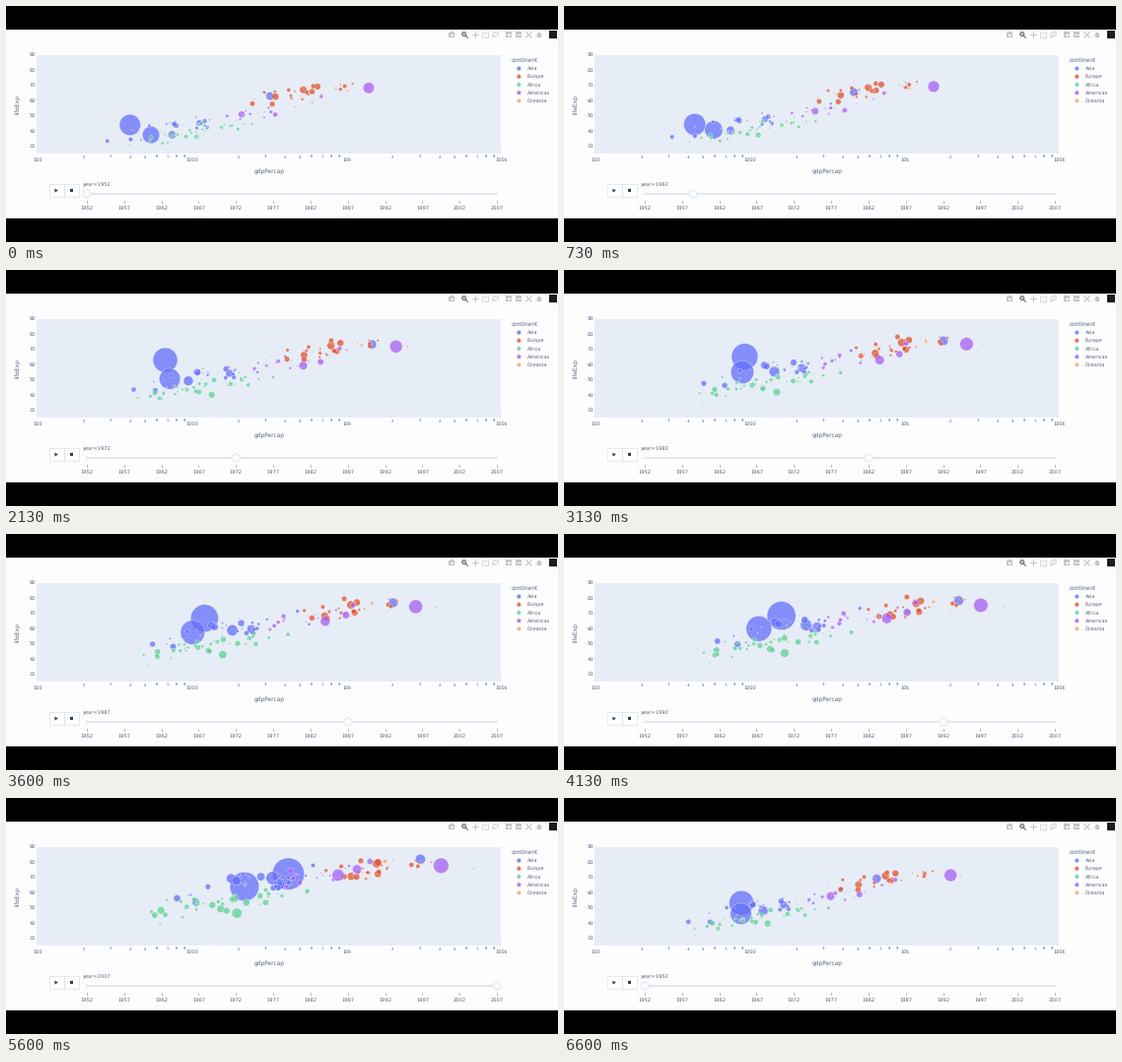
A matplotlib script that plays this animation: 560 px wide and 240 px high, repeating every 6670 ms.

```python
import matplotlib.pyplot as plt
import numpy as np
from matplotlib.animation import FuncAnimation
from matplotlib.patches import Circle, Ellipse, FancyBboxPatch, Polygon, Rectangle

plt.rcParams.update({"font.family": "DejaVu Sans", "text.hinting": "none"})

W, H, DPI = 560, 240, 80
PT = 72 / DPI                      # points per pixel
FRAMES, INTERVAL = 230, 29
TICK = 66.7                        # the picture is refreshed 15 times a second
FIRST, PERIOD, MOVE, GRIP_MOVE = 152, 519, 500, 150
REPLAY = 6318
INK, RAIL = "#566380", "#ccd4e1"
SOFT, DARK = "#c4c4c6", "#77777c"
LEFT, RIGHT, TOP, BOTTOM = 31.3, 502.0, 50.0, 150.2
YEARS = np.arange(12)
COLORS = {"Asia": "#636efa", "Europe": "#de5230", "Africa": "#5fd096",
          "Americas": "#a660f4", "Oceania": "#f5a866"}

rng = np.random.default_rng(7)


# ---------- data ----------
def x_of(log_gdp):
    return LEFT + (log_gdp - 2) * (RIGHT - LEFT) / 3


def y_of(life):
    return TOP + (90 - life) * (BOTTOM - TOP) / 65


def track(log_gdp, life, pop, grow):
    """x, y and diameter per year; the population grows by a constant rate."""
    pop = pop * grow ** (YEARS / 11)
    return x_of(log_gdp), y_of(life), 33 * np.sqrt(pop / 1318)


def leader(pop, grow, *keys):
    """A large country, led through a few (year, gdp, life) points."""
    year, gdp, life = zip(*keys)
    return track(np.interp(YEARS, year, np.log10(gdp)),
                 np.interp(YEARS, year, life), pop, grow)


def crowd(n, gdp, spread, rise, life, gain, pop, decay, grow):
    """Countries strewn along a typical course, each smaller than the last."""
    s = YEARS / 11
    for rank in range(n):
        rich, pace, health, care = np.clip(rng.normal(size=4), -1.8, 1.8)
        log_gdp = gdp + spread * rich + (rise + 0.13 * pace) * s
        years = (life + 16 * spread * rich + 2.5 * health
                 + (gain + 2.5 * care) * s * (1.3 - 0.3 * s))
        yield track(log_gdp, np.minimum(years, 82 - rank % 5), pop * decay ** rank, grow)


LEADERS = {
    "Asia": [
        leader(556, 2.37, (0, 400, 44), (2, 488, 44.5), (3, 613, 58.4), (4, 677, 63.1),
               (6, 962, 65.5), (8, 1656, 68.7), (11, 4959, 73)),
        leader(372, 2.98, (0, 547, 37.4), (4, 724, 50.7), (8, 1164, 60.2), (11, 2452, 64.7)),
        leader(82, 2.73, (0, 750, 37.5), (3, 762, 46), (8, 2383, 62.7), (11, 3541, 70.7)),
        leader(86, 1.48, (0, 3217, 63), (4, 14779, 73.4), (11, 31656, 82.6)),
    ],
    "Africa": [leader(33, 4.1, (0, 1077, 36.3), (11, 2014, 46.9))],
    "Americas": [
        leader(57, 3.33, (0, 2109, 50.9), (5, 6660, 61.5), (11, 9066, 72.4)),
        leader(30, 3.63, (0, 3478, 50.8), (6, 9611, 67.4), (11, 11978, 76.2)),
        leader(158, 1.91, (0, 13990, 68.4), (11, 42952, 78.2)),
    ],
}
CROWDS = {
    "Asia": crowd(27, 3.05, 0.33, 0.50, 46, 23, 47, 0.85, 3.0),
    "Europe": crowd(29, 3.76, 0.21, 0.52, 66, 11, 69, 0.87, 1.3),
    "Africa": crowd(48, 2.98, 0.24, 0.18, 39, 15, 22, 0.93, 3.6),
    "Americas": crowd(21, 3.48, 0.20, 0.35, 53, 20, 18, 0.82, 2.6),
    "Oceania": crowd(2, 4.01, 0.01, 0.45, 69, 11, 9, 0.25, 2.3),
}
tracks, fills = [], []
for name, color in COLORS.items():
    group = LEADERS.get(name, []) + list(CROWDS[name])
    tracks += group
    fills += [color] * len(group)
DATA = np.array(tracks).transpose(1, 2, 0)      # (x y d, year, country)

# ---------- stage ----------
fig = plt.figure(figsize=(W / DPI, H / DPI), dpi=DPI, facecolor="black")
ax = fig.add_axes([0, 0, 1, 1])
ax.set(xlim=(0, W), ylim=(H, 0))
ax.axis("off")


def add(patch, z=1):
    patch.set_zorder(z)
    return ax.add_patch(patch)


def box(x, y, w, h, fill="none", edge="none", lw=0.5, z=1, **kw):
    return add(Rectangle((x, y), w, h, fc=fill, ec=edge, lw=lw * PT, **kw), z)


def line(xs, ys, color, lw, z=1):
    ax.plot(xs, ys, color=color, lw=lw * PT, zorder=z)


def label(x, y, s, px=5, ha="center", **kw):
    return ax.text(x, y, s, fontsize=px * PT, color=INK, ha=ha, va="center",
                   zorder=5, **kw)


def slot(k):
    return 82 + 37.83 * k


box(0, 24, W, 192, "#fdfdfe", z=0)
plot = box(LEFT, TOP, RIGHT - LEFT, BOTTOM - TOP, "#e7edf6")

# axes
for life in range(30, 91, 10):
    label(30.2, y_of(life), str(life), ha="right")
for power, name in enumerate(["100", "1000", "10k", "100k"], 2):
    label(x_of(power) + 0.6, 156.8, name)
for power in (2, 3, 4):
    for digit in range(2, 10):
        label(x_of(power + np.log10(digit)), 153.4, str(digit), 3.7)
label(266.7, 168.3, "gdpPercap", 5.9)
label(11.3, 100.3, "lifeExp", 5.9, rotation=90)

# legend
label(513, 55.2, "continent", 5.8, "left")
for i, (name, color) in enumerate(COLORS.items()):
    y = 63.6 + 8.2 * i
    add(Circle((520.3, y), 2.2, fc=color, ec="white", lw=0.3, alpha=0.8), 3)
    label(529, y + 0.1, name, ha="left")

# toolbar
box(449, 27.4, 6.4, 4.6, SOFT)
box(450.8, 26.4, 2.8, 1.4, SOFT)
add(Circle((452.2, 29.7), 1.3, fc="white", ec="none"), 2)
add(Circle((464.7, 28.6), 2, fc="#c8c8cc", ec=DARK, lw=1.1 * PT))
line([466.2, 468.2], [30.1, 32.2], DARK, 1.3)
line([473, 479], [29.3, 29.3], SOFT, 1)
line([476, 476], [26.3, 32.3], SOFT, 1)
box(483.4, 26.5, 5.4, 5.4, edge=SOFT, lw=0.9, ls=(0, (2, 1)))
add(Ellipse((496.5, 28.7), 6, 3.8, angle=-15, fc="none", ec=SOFT, lw=0.9 * PT))
line([494.6, 494], [30.4, 32.4], SOFT, 0.9)
for x in (510, 520):
    box(x - 2.9, 26.4, 5.8, 5.8, SOFT)
    line([x - 1.7, x + 1.7], [29.3, 29.3], "white", 0.9, 2)
line([510, 510], [27.6, 31], "white", 0.9, 2)
line([527.8, 533.2], [26.6, 32], SOFT, 1.1)
line([527.8, 533.2], [32, 26.6], SOFT, 1.1)
add(Polygon([(537.8, 29.5), (541, 26.3), (544.2, 29.5)], fc=SOFT, ec="none"))
box(538.8, 29.3, 4.4, 2.9, SOFT)
box(550.7, 25, 8, 7.6, "#1d1b22")

# buttons and slider
for x in (44.2, 59.2):
    box(x, 181, 14.3, 13.2, "white", RAIL)
add(Polygon([(49.4, 185.7), (53, 187.6), (49.4, 189.5)], fc="#2a3f5f", ec="none"), 2)
box(64.9, 186.2, 3, 3, "#2a3f5f", z=2)
add(FancyBboxPatch((81, 190.2), 417.5, 1.6, boxstyle="round,pad=0,rounding_size=0.8",
                   fc="#f8fafc", ec=RAIL, lw=0.5 * PT), 2)
for k in YEARS:
    line([slot(k)] * 2, [197.6, 199.8], INK, 0.5)
    label(slot(k), 205.4, str(1952 + 5 * k), 5.1)
grip = add(Circle((slot(0), 191), 4.1, fc="#f8fafc", ec=RAIL, lw=0.5 * PT), 4)
caption = label(78, 181.6, "", 5.1, "left")

bubbles = ax.scatter(DATA[0, 0], DATA[1, 0], s=1, c=fills, alpha=0.75,
                     edgecolors="white", linewidths=0.4 * PT, zorder=3)
bubbles.set_clip_path(plot)


# ---------- motion ----------
def ease(t):
    t = min(max(t, 0), 1)
    return 4 * t ** 3 if t < 0.5 else 1 - 4 * (1 - t) ** 3


def beat(t):
    """Year left, year reached, and time since the change began."""
    if t >= REPLAY:
        return 11, 0, t - REPLAY
    k = min(int((t - FIRST) // PERIOD) + 1, 11)
    if k < 1:
        return 0, 0, MOVE
    return k - 1, k, t - FIRST - PERIOD * (k - 1)


def draw(i):
    t = int((i * INTERVAL + INTERVAL - 1) / TICK) * TICK
    a, b, since = beat(t)
    x, y, d = DATA[:, a] + (DATA[:, b] - DATA[:, a]) * ease(since / MOVE)
    bubbles.set_offsets(np.column_stack([x, y]))
    bubbles.set_sizes((d * PT) ** 2)
    grip.center = (slot(a + (b - a) * ease(since / GRIP_MOVE)), 191)
    caption.set_text(f"year={1952 + 5 * b}")
    return bubbles, grip, caption


anim = FuncAnimation(fig, draw, frames=FRAMES, interval=INTERVAL,
                     repeat=True, repeat_delay=0, blit=False)
plt.show()
```
